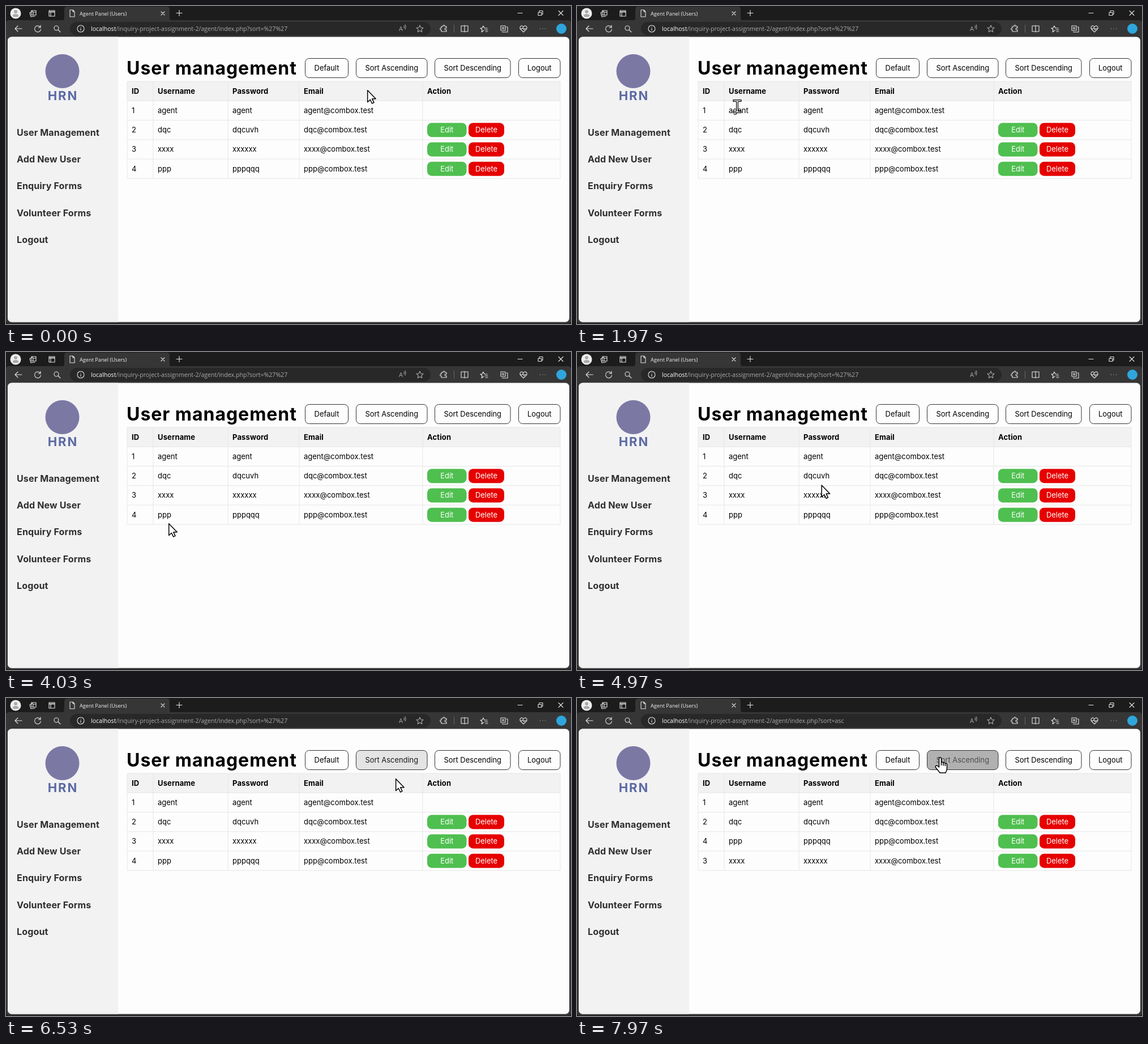
Write an HTML page that moves like this. It is 998 px wide and 561 px high and loops after 8000 ms.

```html
<!DOCTYPE html>
<html lang="en">
<head>
<meta charset="utf-8">
<title>User management</title>
<style>
  html, body { margin: 0; height: 100%; overflow: hidden; background: #0a0a0a; }
  svg { display: block; width: 998px; height: 561px; font: 13px Inter, "Noto Sans", sans-serif; font-optical-sizing: none; }
  .chrome { font-family: "Open Sans", "Noto Sans", sans-serif; }
  .icon { fill: none; stroke: #e4e4e4; stroke-width: 1.1; stroke-linecap: round; stroke-linejoin: round; }
  .dim .icon { stroke: #a8a8a8; }
  .heading { font-size: 32px; font-weight: 700; letter-spacing: .03em; }
  .menu { font-size: 16px; font-weight: 700; letter-spacing: .01em; fill: #2e2e2e; }
  .head { font-weight: 700; letter-spacing: .01em; }
  .button { text-anchor: middle; font-size: 12.9px; }
  .pointer { fill: #fff; stroke: #000; stroke-width: 1.5; stroke-linejoin: round; }
</style>
</head>
<body>
<svg id="stage" viewBox="0 0 998 561"></svg>
<script>
const LOOP = 8000, RELOAD = 7850;
const stage = document.getElementById('stage');

const rect = (x, y, w, h, fill, r = 0, more = '') =>
  `<rect x="${x}" y="${y}" width="${w}" height="${h}" rx="${r}" fill="${fill}" ${more}/>`;
const text = (x, y, content, more = '') => `<text x="${x}" y="${y}" ${more}>${content}</text>`;
const icon = ([x, y, d]) => `<path class="icon" transform="translate(${x} ${y})" d="${d}"/>`;

const star = 'M0-6 1.8-2 6-1.6 2.9 1.4 3.8 5.8 0 3.6-3.8 5.8-2.9 1.4-6-1.6-1.8-2Z';
const icons = [
  [48, 13, 'M-3-5H5V3H-3ZM-3-3-6-1-4 6 3 5M-3-5 0-2H5M0-2V3'],
  [81, 13, 'M-5-5H5V5H-5ZM-5-3H5M-5-2.4H5M-2-2V5'],
  [117, 13, 'M-4-6H1L4-3V6H-4ZM1-6V-3H4'],
  [277, 13, 'M-3-3 3 3M3-3-3 3'],
  [306, 12.5, 'M-5 0H5M0-5V5'],
  [908, 12.5, 'M-4 0H4'],
  [944, 12.5, 'M-4-1H2V4H-4ZM-2-1V-4H4V2H2'],
  [980, 12.5, 'M-4-4 4 4M4-4-4 4'],
  [22, 40, 'M6 0H-6M-1-5-6 0-1 5'],
  [56, 40, 'M5-2A5.5 5.5 0 1 0 5.5 1M5-6V-2H1'],
  [90, 39, 'M3 0A4 4 0 1 1-5 0A4 4 0 1 1 3 0M2 3 6 7'],
  [132, 40, 'M6 0A6 6 0 1 1-6 0A6 6 0 1 1 6 0M0-.5V3M0-3V-2.8'],
  [773, 40, 'M-4-4H-1C-2-7 3-7 2-4H5V-1C1-2 1 3 5 2V5H-4V2C-7 3-7-2-4-1Z'],
  [810, 40, 'M-1-5H-6V5H-1M1-5H6V5H1M0-6V6'],
  [845, 40, 'M-2-5 0-1H5M-2-5-4-1H-7L-4 2-5 6-1 3M1 2H6M2 5H6'],
  [880, 40, 'M-6-5H2V3H-6ZM4-3H6V6H-3V5M-2-3V1M-4-1H0'],
  [914, 40, 'M0 6-5 1C-8-3-3-8 0-3C3-8 8-3 5 1ZM-6 0H-2L-1-2 1 2 2 0H6'],
  [948, 40, 'M-4.5 0H-4.4M0 0H.1M4.5 0H4.6']
];
const dimIcons = [[703, 37, 'M0-2Q1 0 0 2M2-4Q4 0 2 4'], [731, 40, star]];

const columns = [214, 260, 392, 518, 736, 979];
const rowTop = i => 133 + 34.25 * i;
const users = [
  [1, 'agent', 'agent', 'agent@combox.test'],
  [2, 'dqc', 'dqcuvh', 'dqc@combox.test'],
  [3, 'xxxx', 'xxxxxx', 'xxxx@combox.test'],
  [4, 'ppp', 'pppqqq', 'ppp@combox.test']
];
const ascending = [0, 1, 3, 2].map(i => users[i]);

const cells = (values, row, more) =>
  values.map((v, i) => text(columns[i] + 8, rowTop(row) + 21.5, v, more)).join('');
const rows = list => list.map((user, i) => cells(user, i + 1)).join('');

const button = (x, w, label, id = '') =>
  `<g id="${id}">${rect(x, 92.5, w, 34, '#fdfdfd', 7, 'stroke="#333"')}
   ${text(x + w / 2, 114, label, 'class="button"')}</g>`;

const action = (x, y, w, fill, label) =>
  rect(x, y, w, 25, fill, 8) + text(x + w / 2, y + 17, label, 'class="button" fill="#fff"');

const browser = `<g class="chrome">
  ${rect(0, 0, 998, 561, '#1c1c1c')}
  ${rect(0, 25, 998, 535, '#363636', 5)}
  <path d="M98 26Q103 26 103 20V6Q103 1 108 1H284Q289 1 289 6V20Q289 26 294 26Z" fill="#363636"/>
  ${rect(113, 28, 637, 24, '#282828', 12)}
  <circle cx="17" cy="13" r="9.5" fill="#eee"/>
  <circle cx="17" cy="10" r="3" fill="#aaa"/>
  <path d="M11.5 18Q12 14 17 14T22.5 18Q17 21 11.5 18Z" fill="#aaa"/>
  ${icons.map(icon).join('')}
  <g class="dim">${dimIcons.map(icon).join('')}</g>
  ${rect(791, 33, 1, 14, '#666')}
  <circle cx="981" cy="40" r="9" fill="#2ea6dc"/>
  ${text(130, 16.5, 'Agent Panel (Users)', 'font-size="9.2" fill="#f2f2f2"')}
  ${text(694, 44, 'A', 'font-size="11" fill="#a8a8a8"')}
  <text x="150" y="44" font-size="10.6" fill="#aaa"><tspan fill="#fff">localhost</tspan>/inquiry-project-assignment-2/agent/index.php?sort=<tspan id="sort"></tspan></text>
</g>`;

const grid = Array.from({ length: 6 }, (_, i) => `M214 ${rowTop(i)}H979`).join('') +
  columns.map(x => `M${x} 133V304`).join('');

const page = `<clipPath id="view">${rect(3, 54.5, 992, 503, '#fff', 7)}</clipPath>
<g clip-path="url(#view)">
  ${rect(3, 54, 992, 504, '#fdfdfd')}
  ${rect(3, 54, 195, 504, '#f2f2f3')}
  <circle cx="99.5" cy="115" r="30" fill="#7c78a4"/>
  ${text(100.5, 166, 'HRN', 'text-anchor="middle" font-size="22" font-weight="700" letter-spacing="2" fill="#5b69a4"')}
  ${['User Management', 'Add New User', 'Enquiry Forms', 'Volunteer Forms', 'Logout']
    .map((label, i) => text(19, 228.8 + 47.25 * i, label, 'class="menu"')).join('')}
  ${text(213, 120.5, 'User management', 'class="heading"')}
  ${button(528.5, 76, 'Default')}
  ${button(618.5, 125.5, 'Sort Ascending', 'ascending')}
  ${button(757.5, 133.5, 'Sort Descending')}
  ${button(905.5, 73.5, 'Logout')}
  ${rect(214, 133, 765, 34, '#f2f2f2')}
  <path d="${grid}" fill="none" stroke="#e6e6e6"/>
  ${cells(['ID', 'Username', 'Password', 'Email', 'Action'], 0, 'class="head"')}
  <g id="before">${rows(users)}</g>
  <g id="after">${rows(ascending)}</g>
  ${[2, 3, 4].map(i => action(744, rowTop(i) + 4.7, 69.5, '#4fbf50', 'Edit') +
    action(817, rowTop(i) + 4.7, 63, '#e60000', 'Delete')).join('')}
</g>`;

const beam = 'M-5.5-10H-2Q0-10 0-8Q0-10 2-10H5.5M0-8V8M-5.5 10H-2Q0 10 0 8Q0 10 2 10H5.5';
const pointers = `<g id="cursor">
  <path id="arrow" class="pointer" d="M.7.7V21.5L5.4 17.3 8.7 24 12 22.4 8.8 15.8H15.2Z"/>
  <g id="beam" fill="none" stroke-linecap="square">
    <path d="${beam}" stroke="#000" stroke-width="4"/>
    <path d="${beam}" stroke="#fff" stroke-width="1.6"/>
  </g>
  <path id="hand" class="pointer" d="M-1.5 15V2Q-1.5 0 .5 0T2.5 2V9Q4.5 7 6 9.5Q8 8 9.3 10.5Q12.5 9.5 12.5 13V19Q12.5 23 10 27H0Q-3 23-7.5 17.5Q-8.5 15-6 14.3Q-4 14-1.5 17ZM2.5 9V14M6 10V14.5M9.3 11V15"/>
</g>`;

stage.innerHTML = browser + page + pointers;
const part = id => document.getElementById(id);
const show = (id, visible) => part(id).setAttribute('visibility', visible ? 'visible' : 'hidden');

// Each key: time, then values.
const path = [
  [0, 638, 148], [150, 634, 149], [900, 284, 170], [1100, 282, 171], [1500, 283, 177], [2900, 283, 177],
  [3900, 287, 302], [4700, 287, 302], [5400, 660, 127], [5600, 690, 112], [5740, 707, 127], [5770, 709, 131],
  [5950, 700, 145], [6100, 670, 135], [6300, 685, 115], [6420, 689, 127], [6530, 688, 142],
  [6800, 670, 138], [7000, 641, 105], [LOOP, 641, 105]
];
const hover = [
  [0, 0], [5400, 0], [5650, .8], [5770, .45], [5920, 0], [6160, 0], [6400, .6], [6530, .1], [6570, 0],
  [6870, 0], [7170, 1], [RELOAD - 1, 1], [RELOAD, 0], [7970, .3], [LOOP, .37]
];

function sample(keys, t) {
  const i = Math.max(1, keys.findIndex(k => k[0] > t));
  const a = keys[i - 1], b = keys[i];
  const u = (t - a[0]) / (b[0] - a[0]);
  return a.slice(1).map((v, n) => v + (b[n + 1] - v) * u);
}

function pointerAt(x, y) {
  if (x > 618 && x < 744 && y > 92 && y < 127) return 'hand';
  const overName = x > 268 && x < 292 && [1, 2, 3, 4].some(i => Math.abs(y - rowTop(i) - 17) < 9.8);
  return overName ? 'beam' : 'arrow';
}

function draw(t) {
  const [x, y] = sample(path, t), [p] = sample(hover, t);
  const sorted = t >= RELOAD, shape = pointerAt(x, y);
  const gray = v => `rgb(${v},${v},${v})`;
  const [box, label] = part('ascending').children;
  box.setAttribute('fill', gray(Math.round(253 * (1 - p))));
  label.setAttribute('fill', gray(Math.round(255 * p)));
  part('sort').textContent = sorted ? 'asc' : '%27%27';
  show('before', !sorted);
  show('after', sorted);
  part('cursor').setAttribute('transform', `translate(${x} ${y})`);
  for (const id of ['arrow', 'beam', 'hand']) show(id, id === shape);
}

const start = performance.now();
function tick() {
  draw((performance.now() - start) % LOOP);
  requestAnimationFrame(tick);
}
tick();
</script>
</body>
</html>
```
